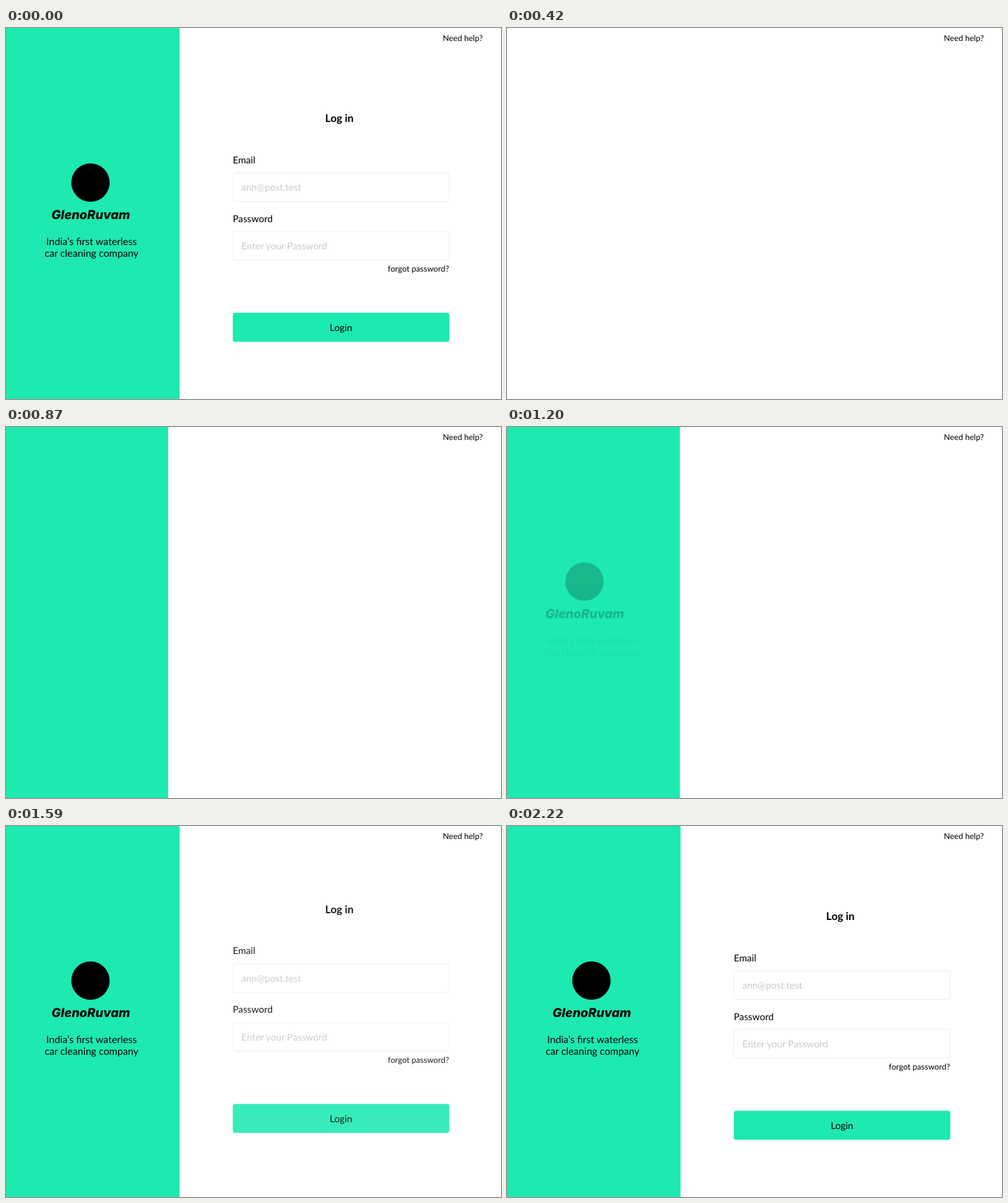
An HTML page that plays this animation: 800 by 600 pixels, repeating every 2.25 s.

```html
<!DOCTYPE html>
<html lang="en">
<head>
<meta charset="utf-8">
<title>Log in</title>
<style>
  html, body { margin: 0; width: 100%; height: 100%; overflow: hidden; background: #fff; }
  svg { display: block; width: 800px; height: 600px; font-family: Lato, sans-serif; font-size: 15.4px; text-rendering: geometricPrecision; }
  .mint { fill: #1de9b1; }
  .box { fill: #fff; stroke: #ededed; }
  .hint { fill: #c9c9c9; }
  .small { font-size: 13.1px; text-anchor: end; }
  .mid { text-anchor: middle; }
  .title { font-size: 17.3px; font-weight: 700; }
  .brand { font: italic 800 20px Inter, sans-serif; }
  .tagline { font-size: 16.1px; }
</style>
</head>
<body>
<svg viewBox="0 0 800 600">
  <rect id="panel" class="mint" width="280.5" height="600"/>
  <g id="logo">
    <circle cx="136.5" cy="250" r="31"/>
    <text class="brand mid" x="137" y="309">GlenoRuvam</text>
  </g>
  <g id="tagline" class="tagline mid">
    <text x="138.3" y="350.5">India’s first waterless</text>
    <text x="138.3" y="370">car cleaning company</text>
  </g>
  <text id="help" class="small" x="770.5" y="21">Need help?</text>
  <g id="form">
    <text class="title mid" x="538.8" y="152">Log in</text>
    <text x="366.5" y="218.5">Email</text>
    <rect class="box" x="367" y="234" width="349" height="46.5" rx="4"/>
    <text class="hint" x="380.5" y="263">ann@post.test</text>
    <text x="366.5" y="313.5">Password</text>
    <rect class="box" x="367" y="329" width="349" height="46.5" rx="4"/>
    <text class="hint" x="380.5" y="358">Enter your Password</text>
    <text class="small" x="716" y="394">forgot password?</text>
    <rect class="mint" x="366.5" y="460.5" width="350" height="47" rx="4"/>
    <text class="mid" x="541.5" y="490">Login</text>
  </g>
</svg>
<script>
  const LOOP = 2250, STEP = 30;
  const $ = id => document.getElementById(id);
  const [panel, logo, tagline, help, form] =
    ['panel', 'logo', 'tagline', 'help', 'form'].map($);

  // [time, width] of the panel: a fast wipe with a long settle
  const wipe = [
    [420, 0], [450, 115], [480, 165], [510, 188], [540, 205], [585, 218],
    [630, 229.5], [690, 240], [780, 252.5], [870, 262], [960, 269],
    [1080, 275.5], [1200, 279.4], [1290, 280.5]
  ];

  const progress = (t, start, length) => Math.min(1, Math.max(0, (t - start) / length));
  const remaining = (p, power) => (1 - p) ** power;

  function lookup(points, t) {
    if (t <= points[0][0]) return points[0][1];
    for (let i = 1; i < points.length; i++) {
      const [t0, v0] = points[i - 1], [t1, v1] = points[i];
      if (t <= t1) return v0 + (v1 - v0) * (t - t0) / (t1 - t0);
    }
    return points[points.length - 1][1];
  }

  function place(el, opacity, x = 0, y = 0) {
    el.setAttribute('opacity', opacity);
    el.setAttribute('transform', `translate(${x} ${y})`);
  }

  function draw(time) {
    // The loop opens on the finished screen, then cuts to blank.
    const t = time < STEP ? LOOP : time;
    panel.setAttribute('width', lookup(wipe, t));
    place(help, progress(t, 0, 300));
    place(logo, progress(t, 1138, 300), -20 * remaining(progress(t, 1140, 450), 4));
    place(tagline, progress(t, 1190, 300));
    place(form, progress(t, 1320, 308), 0, -24 * remaining(progress(t, 1320, 840), 2));
  }

  const begin = performance.now();
  function tick() {
    const elapsed = (performance.now() - begin) % LOOP;
    draw(Math.floor(elapsed / STEP) * STEP);
    requestAnimationFrame(tick);
  }
  tick();
</script>
</body>
</html>
```
